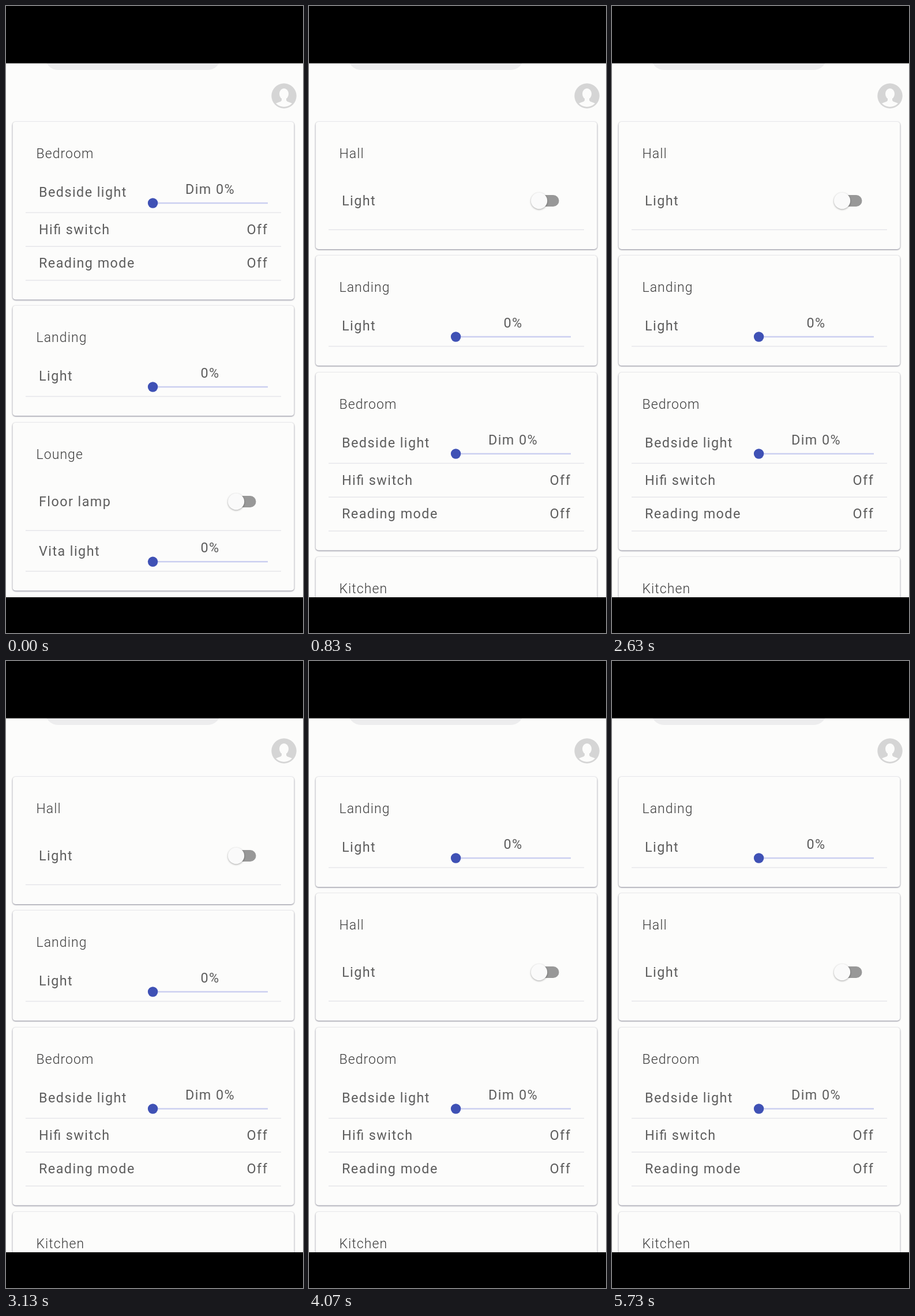
Animation of 515x1088 px, one loop 5760 ms. Source, as an HTML page:

```html
<!DOCTYPE html>
<html lang="en">
<head>
<meta charset="utf-8">
<title>Home control</title>
<style>
  html, body { margin: 0; width: 515px; height: 1088px; overflow: hidden; background: #000; }
  svg { display: block; }
  text { font: 400 23.4px Roboto, sans-serif; letter-spacing: 1.42px; fill: #5d5d5d; }
  .title { font-size: 23px; font-weight: 300; letter-spacing: 1.08px; fill: #3c3c3c; }
  .card { fill: #fcfcfb; filter: drop-shadow(0 1.5px .8px rgba(0, 0, 30, .42)) drop-shadow(0 0 1px rgba(0, 0, 60, .14)); }
  .divider { stroke: #e6e6ea; stroke-width: 1.5; }
  .rail { stroke: #cbcff0; stroke-width: 2.5; }
  .thumb { fill: #3f51b5; }
  .knob { fill: #fafafa; filter: drop-shadow(0 1.5px 1.5px rgba(0, 0, 0, .35)); }
</style>
</head>
<body>
<svg width="515" height="1088" viewBox="0 0 515 1088">
  <defs><clipPath id="face"><circle cx="482" cy="156" r="19"/></clipPath></defs>
  <rect y="99" width="515" height="927" fill="#fcfcfb"/>
  <rect x="68" y="66" width="304" height="45" rx="22" fill="#ededee"/>
  <circle cx="482" cy="156" r="21.7" fill="#d5d5d5"/>
  <g fill="#fcfcfb" clip-path="url(#face)">
    <ellipse cx="482" cy="152.5" rx="8" ry="9.5"/>
    <path d="M478 158h8v6q1 2 5 3q8 2 9 8h-36q1-6 9-8q4-1 5-3z"/>
  </g>
  <g id="views"></g>
  <path d="M0 0H515V99.5H0zM0 1026H515V1088H0z"/>
</svg>
<script>
const LOOP = 5760;
const HEADER = 87, FOOTER = 33.6;

const label = (x, y, str, attrs = '') => `<text x="${x}" y="${y + 8.3}" ${attrs}>${str}</text>`;

// Each row kind has a height and a drawing for its right-hand control.
const kinds = {
  slider: {
    height: 70.5, middle: 35,
    draw: (y, value) => label(354, y + 29.5, value, 'text-anchor="middle"') +
      `<path class="rail" d="M254 ${y + 54}H454"/><circle class="thumb" cx="254.6" cy="${y + 54}" r="8.7"/>`
  },
  text: {
    height: 58.7, middle: 28.7,
    draw: (y, value) => label(454.2, y + 28.7, value, 'text-anchor="end"')
  },
  toggle: {
    height: 100.3, middle: 50,
    draw: y => `<rect x="389" y="${y + 40}" width="44.5" height="20" rx="10" fill="#989898"/>` +
      `<circle class="knob" cx="399" cy="${y + 50}" r="14.2"/>`
  }
};

const rooms = {
  Hall: [['toggle', 'Light']],
  Landing: [['slider', 'Light', '0%']],
  Bedroom: [['slider', 'Bedside light', 'Dim 0%'], ['text', 'Hi\uFB01 switch', 'Off'], ['text', 'Reading mode', 'Off']],
  Lounge: [['toggle', 'Floor lamp'], ['slider', 'Vita light', '0%']],
  Kitchen: [['toggle', 'Light']]
};

function card(name, top) {
  let y = top + HEADER, rows = '';
  for (const [kind, caption, value] of rooms[name]) {
    const { height, middle, draw } = kinds[kind];
    rows += label(57, y + middle, caption) + draw(y, value);
    y += height;
    rows += `<path class="divider" d="M34 ${y}H477"/>`;
  }
  return `<rect class="card" x="11.5" y="${top}" width="488" height="${y + FOOTER - top}" rx="5"/>` +
    label(52.5, top + 54.5, name, 'class="title"') + rows;
}

const views = [
  { from: 0, cards: { Bedroom: 201, Landing: 520, Lounge: 723 } },
  { from: 200, cards: { Hall: 201, Landing: 433, Bedroom: 636, Kitchen: 956 } },
  { from: 3300, cards: { Landing: 201, Hall: 403, Bedroom: 636, Kitchen: 956 } }
];

const host = document.getElementById('views');
host.innerHTML = views.map(({ cards }) =>
  `<g>${Object.entries(cards).map(([name, top]) => card(name, top)).join('')}</g>`).join('');

function frame(now) {
  const t = now % LOOP;
  const current = views.findLastIndex(view => t >= view.from);
  [...host.children].forEach((group, i) => group.style.display = i === current ? '' : 'none');
  requestAnimationFrame(frame);
}
frame(performance.now());
</script>
</body>
</html>
```
